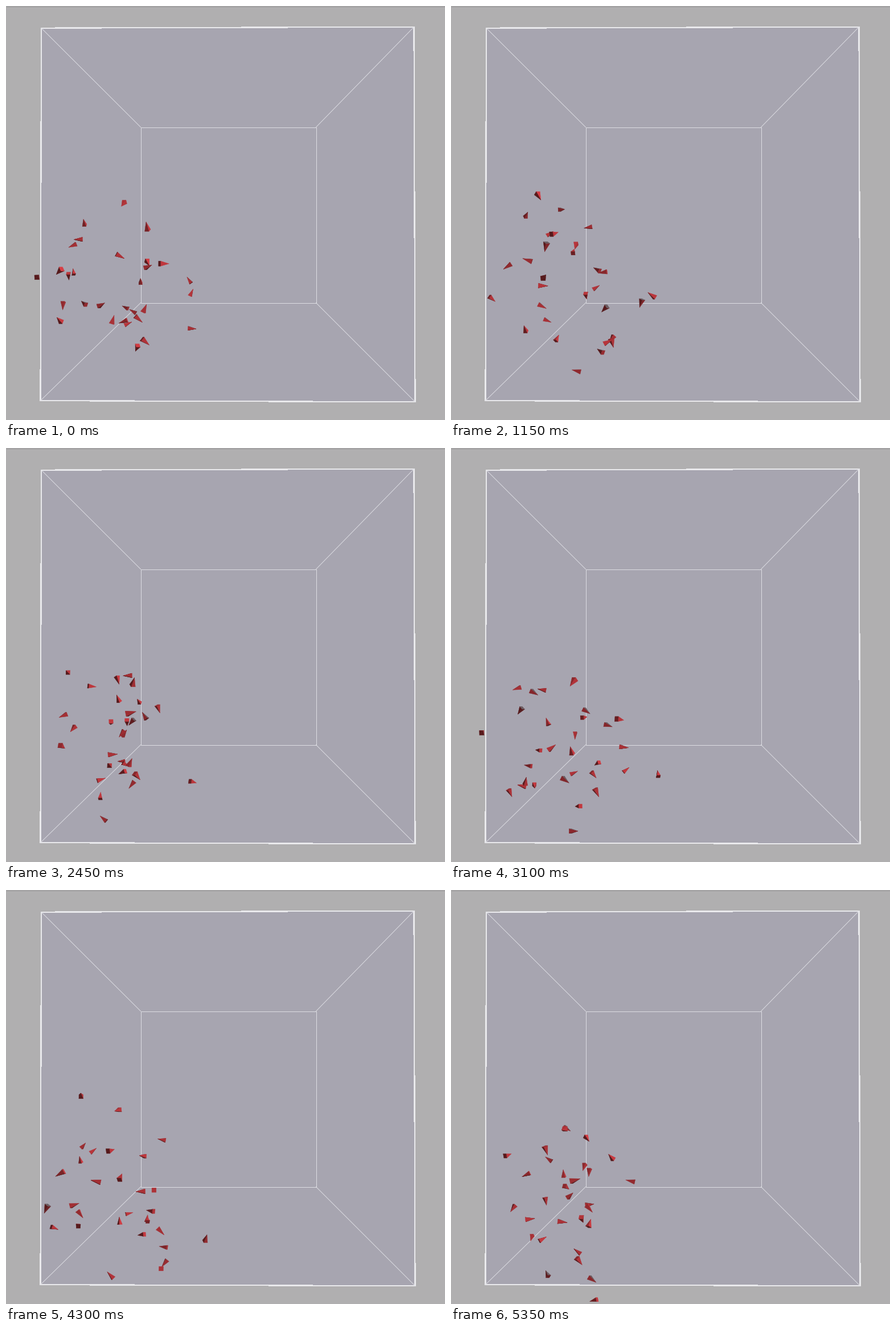
Write a matplotlib script that moves like this. It is 771x726 px and loops after 5.4 s.

```python
import numpy as np
import matplotlib.pyplot as plt
from matplotlib.animation import FuncAnimation
from matplotlib.collections import PolyCollection

W, H, DPI = 771, 726, 100
FRAMES, STEP = 108, 50
LOOP = FRAMES * STEP / 1000
N, LENGTH, HALF, PACE = 30, 15, 3.7, 140
FLATTEN = np.array([1, 1, 0.7])
rng = np.random.default_rng(8)


def directions(n):
    v = rng.normal(size=(n, 3))
    return v / np.linalg.norm(v, axis=1, keepdims=True)


def orbit(radius, speed):
    """Random circular paths: two axes, angular speed and phase per boid."""
    a, b = directions(N), directions(N)
    b = np.cross(a, b)
    b /= np.linalg.norm(b, axis=1, keepdims=True)
    return radius[:, None] * a, radius[:, None] * b, speed / radius, rng.uniform(0, 2 * np.pi, N)


home = directions(N) * 110 * rng.random((N, 1)) ** (1 / 3)
orbits = [orbit(rng.uniform(50, 85, N), PACE), orbit(rng.uniform(15, 25, N), 40)]


def flock(t):
    """Positions and unit headings of all boids at t seconds."""
    u = t / LOOP
    pos = home + (197, 497 + 50 * u ** 2 - 15 * np.sin(2 * np.pi * u), 0)
    vel = np.zeros((N, 3))
    for a, b, omega, phase in orbits:
        angle = (omega * t + phase)[:, None]
        pos = pos + FLATTEN * (a * np.cos(angle) + b * np.sin(angle))
        vel += FLATTEN * omega[:, None] * (b * np.cos(angle) - a * np.sin(angle))
    return pos, vel / np.linalg.norm(vel, axis=1, keepdims=True)


def unit(v):
    return np.asarray(v, float) / np.linalg.norm(v)


RED, GREY = np.array([225, 65, 72]) / 255, np.array([108, 92, 97]) / 255
LIGHT, SHEEN = unit((0.45, -0.5, -0.55)), unit((0.45, -0.87, -0.15))
CORNERS = [(-1, -1), (1, -1), (1, 1), (-1, 1)]
FACES = [(4, i, (i + 1) % 4) for i in range(4)] + [(0, 1, 2, 3)]


def shade(normal):
    if normal @ SHEEN > 0.9:
        return GREY
    return RED * (0.38 + 0.58 * max(0, normal @ LIGHT))


def pyramid(pos, fwd):
    """Visible faces and colours of one boid."""
    side = unit(np.cross(fwd, (0, 1, 0)))
    up = np.cross(side, fwd)
    size = 1 - pos[2] / 600
    half_axis = fwd * LENGTH * size / 2
    base = [pos - half_axis + HALF * size * (a * side + b * up) for a, b in CORNERS]
    pts = np.array(base + [pos + half_axis])
    centre = pts.mean(0)
    for ids in FACES:
        face = pts[list(ids)]
        normal = unit(np.cross(face[1] - face[0], face[2] - face[0]))
        normal *= np.sign(normal @ (face.mean(0) - centre))
        if normal[2] < 0:
            yield face[:, :2], shade(normal)


fig = plt.figure(figsize=(W / DPI, H / DPI), dpi=DPI, facecolor="#b0afb0")
ax = fig.add_axes([0, 0, 1, 1])
ax.set(xlim=(-0.5, W - 0.5), ylim=(H - 0.5, -0.5))
ax.axis("off")

FRONT = [(61.5, 38.2), (716, 36.2), (718, 693.7), (60, 691.6)]
REAR = [(236, 212), (544, 212), (544, 520), (236, 520)]
ax.add_patch(plt.Polygon(FRONT, fc="#a7a5b0", ec="#e9e9ec", lw=0.9, aa=False))
ax.add_patch(plt.Polygon(REAR, fc="none", ec="#dcdce2", lw=0.72))
for a, b in zip(FRONT, REAR):
    ax.plot(*zip(a, b), color="#dcdce2", lw=0.7)
ax.plot([0, W - 1, W - 1], [0, 0, H], color="#949395", lw=0.72)

boids = PolyCollection([], edgecolors="face", linewidths=0.3, zorder=5)
ax.add_collection(boids, autolim=False)


def draw(i):
    pos, heading = flock(i * STEP / 1000)
    far_first = np.argsort(-pos[:, 2])
    faces = [f for k in far_first for f in pyramid(pos[k], heading[k])]
    verts, colors = zip(*faces)
    boids.set_verts(verts)
    boids.set_facecolor(colors)
    return boids,


anim = FuncAnimation(fig, draw, frames=FRAMES, interval=STEP, repeat=True,
                     repeat_delay=0, blit=False)
plt.show()
```
